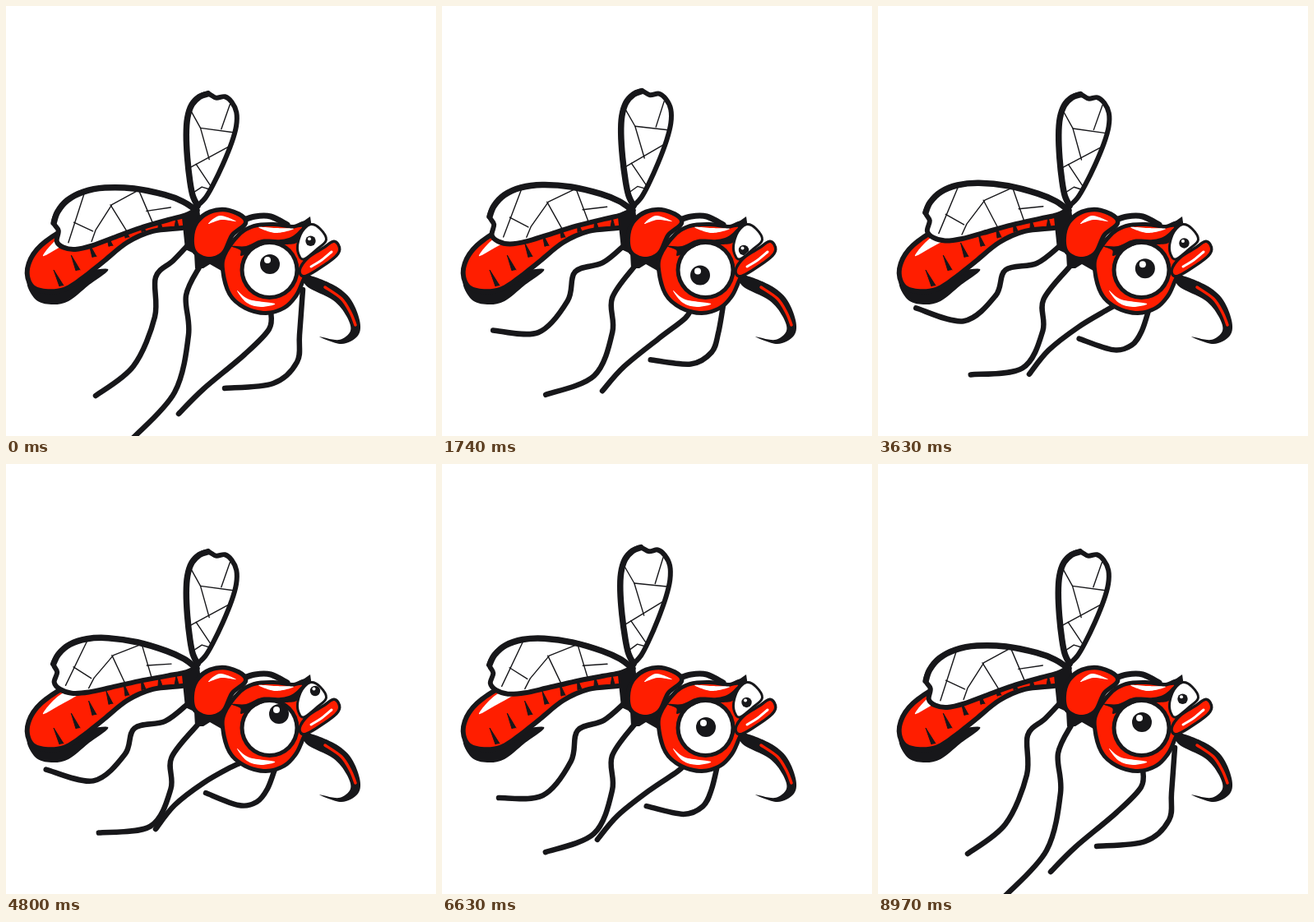
An HTML page with a canvas that plays this animation: 523 px wide and 523 px high, repeating every 9000 ms.

```html
<!DOCTYPE html>
<html lang="en">
<head>
<meta charset="utf-8">
<title>Mosquito</title>
<style>
html, body { margin: 0; width: 100%; height: 100%; overflow: hidden; background: #fff; }
canvas { display: block; width: 523px; height: 523px; }
</style>
</head>
<body>
<canvas id="stage" width="523" height="523"></canvas>
<script>
const ctx = document.getElementById('stage').getContext('2d');
const LOOP = 9000, STEP = 30, STRIDE = 8400;
const BLACK = '#17171a', RED = '#ff1e00', WHITE = '#fff';

const lerp = (a, b, k) => a + (b - a) * k;
const smooth = k => k * k * (3 - 2 * k);
const pairs = flat => {
  const out = [];
  for (let i = 0; i < flat.length; i += 2) out.push([flat[i], flat[i + 1]]);
  return out;
};

// Values at shared key times, blended with an easing.
const KEYS = [0, 990, 2490, 4800, 5730, 7530, 8970];
function keyed(values, t, ease = k => k) {
  let i = 0;
  while (i < KEYS.length - 2 && t >= KEYS[i + 1]) i++;
  const k = Math.min(1, (t - KEYS[i]) / (KEYS[i + 1] - KEYS[i]));
  return lerp(values[i], values[i + 1], ease(k));
}

function spline(pts, closed) {
  const n = pts.length;
  const at = i => closed ? pts[(i + n) % n] : pts[Math.max(0, Math.min(n - 1, i))];
  ctx.beginPath();
  ctx.moveTo(...pts[0]);
  for (let i = 0; i < (closed ? n : n - 1); i++) {
    const [a, b, c, d] = [at(i - 1), at(i), at(i + 1), at(i + 2)];
    ctx.bezierCurveTo(
      b[0] + (c[0] - a[0]) / 6, b[1] + (c[1] - a[1]) / 6,
      c[0] - (d[0] - b[0]) / 6, c[1] - (d[1] - b[1]) / 6, c[0], c[1]);
  }
  if (closed) ctx.closePath();
}
function poly(pts) {
  ctx.beginPath();
  pts.forEach(p => ctx.lineTo(...p));
}
function fill(color) { ctx.fillStyle = color; ctx.fill(); }
function stroke(width, color = BLACK) {
  ctx.lineWidth = width;
  ctx.strokeStyle = color;
  ctx.stroke();
}
function blob(color, ...flat) { spline(pairs(flat), true); fill(color); }
function curve(width, color, ...flat) { spline(pairs(flat), false); stroke(width, color); }
// A filled shape with an ink border lying outside it.
function inked(color, border, ...flat) {
  spline(pairs(flat), true);
  stroke(border * 2);
  fill(color);
}
function disc(x, y, r, color) {
  ctx.beginPath();
  ctx.arc(x, y, r, 0, Math.PI * 2);
  fill(color);
}

// Each leg swings between a hanging and a tucked pose; lag skews the stride.
const LEGS = [
  { lag: 0.9,
    hang: [222,290, 203,310, 182,330, 181,378, 155,438, 109,474],
    tuck: [222,291, 193,313, 155,321, 143,352, 104,383, 46,367] },
  { lag: 1,
    hang: [236,316, 219,352, 222,400, 205,470, 155,525],
    tuck: [234,316, 201,357, 200,395, 175,440, 112,447] },
  { lag: 1.2,
    hang: [322,370, 320,393, 290,424, 240,466, 210,496],
    tuck: [287,363, 275,368, 240,388, 205,415, 182,444] },
  { lag: 1.2,
    hang: [361,345, 357,400, 354,433, 325,459, 266,465],
    tuck: [327,371, 318,395, 305,411, 283,415, 243,400] }
];
function drawLeg({ lag, hang, tuck }, t) {
  const x = Math.min(1, t / STRIDE) ** lag;
  const k = Math.max(0, Math.sin(Math.PI * x)) ** 0.8;
  spline(pairs(hang.map((v, i) => lerp(v, tuck[i], k))), false);
  stroke(6.5);
}

// Wings: the tip offset from the root runs from low to high with each beat.
// Veins are polylines of (distance from root, position across).
const LEFT_WING = {
  root: [231, 248], low: [-173, 28], high: [-181, -63],
  width: [33, 30], bend: 14, side: -1,
  beats: [0, 3.31, 8.5, 15.84, 19, 25.31, 30],
  veins: [
    [.74,-1, .91,.7], [.85,-.05, .73,.5], [.75,.85, .71,.5, .57,-.3, .37,-.95],
    [.58,-.3, .5,.9], [.37,-.95, .31,.95], [.34,.2, .17,0]]
};
const RIGHT_WING = {
  root: [233, 243], low: [17, -145], high: [47, -102],
  width: [30, 30], bend: 0, side: 1,
  beats: [.15, 3.5, 8.27, 16.15, 19, 25.18, 30.15],
  veins: [
    [.83,-1, .68,-.42, .42,.2], [.68,-.42, .69,1], [.93,.8, .7,.43],
    [.31,-1, .57,1], [.36,-.5, .18,1], [.1,-1, .17,.1, .16,1]]
};
function drawWing({ root, low, high, width, bend, side, beats, veins }, t) {
  const u = (1 - Math.cos(keyed(beats, t) * Math.PI * 2)) / 2;
  const dx = lerp(low[0], high[0], u), dy = lerp(low[1], high[1], u);
  const len = Math.hypot(dx, dy);
  const nx = -dy / len * side, ny = dx / len * side;
  const half = lerp(...width, u), arch = bend * (1 - u);
  const at = (s, v) => {
    const h = half * s ** 0.65 * Math.sqrt(1 - s ** 6) / 0.75;
    const off = v * h - 4 * arch * s * (1 - s);
    return [root[0] + dx * s + nx * off, root[1] + dy * s + ny * off];
  };
  const edge = v => [0, .08, .2, .4, .6, .75, .87, .95, .988].map(s => at(s, v));

  spline([...edge(-1), at(.965, 0), ...edge(1).reverse()], true);
  fill(WHITE);
  stroke(6);
  spline(edge(-1), false);
  stroke(7.5);
  for (const vein of veins) {
    poly(pairs(vein).map(p => at(...p)));
    stroke(1.4);
  }
}

function drawProboscis() {
  blob(BLACK, 364,327, 396,338, 418,355, 430,382, 428,401, 408,411, 381,402,
    405,406, 419,395, 414,377, 398,358, 366,341);
  curve(3.5, RED, 388,342, 408,356, 419,373, 425,388);
}

function drawAbdomen() {
  blob(BLACK, 26,335, 36,357, 55,363, 76,359, 100,340, 124,320, 80,325, 50,330);
  inked(RED, 6, 220,258, 180,256, 135,255, 100,262, 66,278, 40,298, 29,320, 33,338,
    48,344, 70,342, 92,328, 116,309, 146,285, 178,271, 219,266);
  for (let j = 0; j < 8; j++) {
    const x = 68 + 20 * j, y = 268 + 72 * (1 - j / 7) ** 2;
    poly([[x - 3, y + 1], [x - 10 + 1.3 * j, y - 19 + 1.2 * j], [x + 2, y]]);
    fill(BLACK);
    stroke(1);
  }
  blob(WHITE, 45,304, 64,282, 95,267, 131,257, 100,274, 68,292);
}

function drawThorax() {
  curve(7, BLACK, 284,262, 303,256, 322,256, 342,266);
  poly(pairs([214,257, 235,246, 240,290, 268,305, 262,322, 248,314, 240,319, 230,319, 229,301, 218,296]));
  fill(BLACK);
  inked(RED, 5.5, 229,282, 234,265, 249,253, 270,251, 289,262, 273,277, 262,299, 246,305, 232,298);
  blob(WHITE, 246,265, 260,255, 280,262, 262,260);
}

function drawHead(t) {
  const gx = keyed([1, -10, -2, 12, 19, -17, 1], t, smooth);
  const gy = keyed([0, 7, 20, -10, 3, 9, 0], t, smooth);

  inked(RED, 5, 266,320, 269,302, 285,280, 302,270, 326,268, 350,271, 363,267, 354,284,
    358,302, 364,318, 357,338, 350,352, 337,365, 316,371, 292,365, 274,349);
  poly([[350, 270], [370, 256], [372, 270]]);
  fill(BLACK);

  // Big eye
  disc(320.5, 321, 36, BLACK);
  disc(320.5, 321, 31, WHITE);
  disc(320 + gx, 314 + gy, 12, BLACK);
  disc(317 + gx, 309 + gy, 4, WHITE);

  // Brow
  blob(RED, 288,288, 292,277, 309,269, 340,272, 360,269, 350,281, 325,284, 304,289);
  blob(BLACK, 274,292, 292,292, 311,284, 334,284, 350,279, 368,262, 356,286, 340,290, 318,289, 300,297, 286,304, 285,297);
  blob(WHITE, 307,269, 328,270, 350,271, 328,276);

  // Small eye
  ctx.save();
  inked(WHITE, 3, 356,292, 361,276, 371,267, 381,272, 388,284, 378,294, 363,306, 358,303);
  ctx.clip();
  const sx = 370 + gx * 0.5, sy = 286 + gy * 0.7 - gx * 0.25;
  disc(sx, sy, 6.2, BLACK);
  disc(sx - 1.5, sy - 2.5, 2, WHITE);
  ctx.restore();

  inked(RED, 3.5, 359,321, 368,308, 388,295, 399,288, 404,296, 398,305, 378,319, 363,327);
  curve(3, WHITE, 371,317, 384,309, 396,299);
  blob(WHITE, 281,346, 296,357, 327,362, 310,366, 293,361);
}

function draw(t) {
  ctx.fillStyle = WHITE;
  ctx.fillRect(0, 0, 523, 523);
  ctx.lineCap = ctx.lineJoin = 'round';
  LEGS.forEach(leg => drawLeg(leg, t));
  drawProboscis();
  drawAbdomen();
  drawWing(RIGHT_WING, t);
  drawWing(LEFT_WING, t);
  drawThorax();
  drawHead(t);
}

const start = performance.now();
function tick(now) {
  const t = Math.max(0, now - start) % LOOP;
  draw(Math.floor(t / STEP) * STEP);
  requestAnimationFrame(tick);
}
draw(0);
requestAnimationFrame(tick);
</script>
</body>
</html>
```
